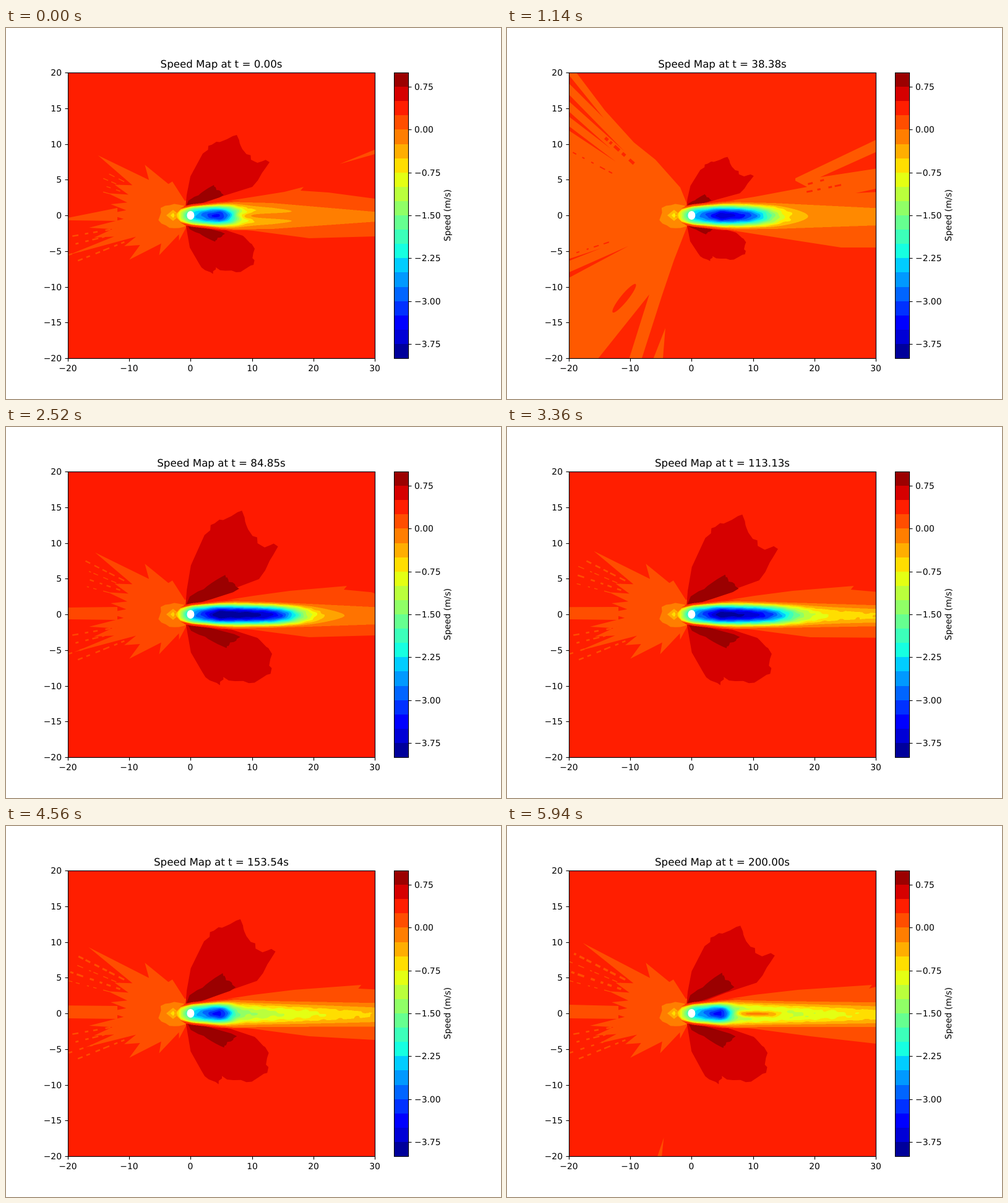
Animation of 800 by 600 pixels, one loop 6 s. Source, as an HTML page with a canvas:

```html
<!DOCTYPE html>
<html lang="en">
<head>
<meta charset="utf-8">
<title>Speed Map</title>
<style>
  html, body { margin: 0; width: 100%; height: 100%; overflow: hidden; background: #fff; }
  canvas { display: block; }
</style>
</head>
<body>
<canvas id="stage" width="800" height="600"></canvas>
<script>
const ctx = document.getElementById('stage').getContext('2d');
const STEPS = 100, STEP_MS = 60;
const LEFT = 100, TOP = 72, RIGHT = 596, BOTTOM = 534;
const BODY_X = 298, BODY_Y = 303;

const clamp = (v, lo, hi) => Math.min(hi, Math.max(lo, v));
const mix = (a, b, k) => a + (b - a) * k;
const sigmoid = v => 1 / (1 + Math.exp(-v));

// Straight segments through [x, y] stops
function ramp(stops, x) {
  let i = 1;
  while (i < stops.length - 1 && x > stops[i][0]) i++;
  const [x0, y0] = stops[i - 1], [x1, y1] = stops[i];
  return mix(y0, y1, clamp((x - x0) / (x1 - x0), 0, 1));
}

function random(seed) {
  return () => {
    seed = (seed + 0x6D2B79F5) | 0;
    let t = Math.imul(seed ^ (seed >>> 15), 1 | seed);
    t = (t + Math.imul(t ^ (t >>> 7), 61 | t)) ^ t;
    return ((t ^ (t >>> 14)) >>> 0) / 4294967296;
  };
}

// Colour scales
const jet = k => {
  k = Math.floor(k * 256) / 255;
  return [
    [[0, 0], [.35, 0], [.66, 1], [.89, 1], [1, .5]],
    [[0, 0], [.125, 0], [.375, 1], [.64, 1], [.91, 0], [1, 0]],
    [[0, .5], [.11, 1], [.34, 1], [.65, 0], [1, 0]]
  ].map(stops => Math.round(255 * ramp(stops, k)));
};

function makeScale(low, high, size) {
  const count = Math.round((high - low) / size);
  const bands = Array.from({ length: count }, (_, i) => jet((i + .5) / count));
  const at = v => bands[clamp(Math.floor((v - low) / size + 1e-6), 0, count - 1)];
  return { bands, at, css: v => `rgb(${at(v)})` };
}
const NORMAL = makeScale(-4, 1, .25);
const DEEP = makeScale(-4.25, 1, .25);
const COARSE = makeScale(-4.5, 1.2, .3);
const isCoarse = step => step >= 14 && step < 38;
const scaleFor = step => isCoarse(step) ? COARSE : step > 10 && step < 50 ? DEEP : NORMAL;

// Shape helpers
function polygon(points, fill) {
  ctx.beginPath();
  points.forEach(([x, y]) => ctx.lineTo(x, y));
  ctx.fillStyle = fill;
  ctx.fill();
}

// Angles in degrees above the upstream (left) direction, seen from the body
function polar(angle, r) {
  const a = angle * Math.PI / 180;
  return [BODY_X - r * Math.cos(a), BODY_Y - r * Math.sin(a)];
}

const wedge = (angle, spread, near, far, fill) =>
  polygon([polar(angle, near), polar(angle - spread / 2, far), polar(angle + spread / 2, far)], fill);

function brokenRay(angle, near, far, width, color) {
  const rnd = random(Math.round(angle * 10));
  ctx.beginPath();
  for (let r = near; r < far; r += 4 + 9 * rnd()) {
    ctx.moveTo(...polar(angle, r));
    ctx.lineTo(...polar(angle, r += 3 + 8 * rnd()));
  }
  ctx.strokeStyle = color;
  ctx.lineWidth = width;
  ctx.stroke();
}

// Adds small teeth to the edges between two vertices
function roughen(points, from, to, amount, seed) {
  const rnd = random(seed), out = [];
  points.forEach(([x, y], i) => {
    out.push([x, y]);
    if (i < from || i >= to) return;
    const [nx, ny] = points[i + 1];
    for (let k = .25; k < 1; k += .25)
      out.push([mix(x, nx, k) + amount * (rnd() - .5), mix(y, ny, k) + amount * (rnd() - .5)]);
  });
  return out;
}

const place = (points, x, y, sx, sy) => points.map(p => [x + p[0] * sx, y + p[1] * sy]);

const UPPER = roughen([[0, 0], [2, -21], [8, -51], [28, -88], [50, -107], [83, -118], [92, -95],
  [112, -75], [136, -74], [108, -34], [60, -19], [30, -8]], 3, 9, 7, 4);
const LOWER = roughen([[0, 0], [3, 17], [7, 40], [22, 66], [45, 83], [49, 72], [82, 80],
  [110, 68], [112, 42], [93, 21], [50, 7], [25, 5]], 3, 9, 6, 9);
const CORE = roughen([[0, 0], [5, -12], [25, -24], [46, -37], [50, -29], [62, -21], [55, -17], [30, -9]], 1, 5, 3, 2);

function drawLobes(step, scale) {
  const coarse = isCoarse(step), k = (step - 19) / 11;
  const late = v => ramp([[0, v[0]], [42, v[1]], [99, v[2]]], step);
  const size = (early, grown, ...all) => coarse ? mix(early, grown, k) : late(all);
  const red = scale.css(.7), dark = scale.css(.95);
  polygon(place(UPPER, 290, 291, size(.8, .86, 1, 1.1, 1.05), size(.7, .73, 1, 1.32, 1.1)), red);
  polygon(place(LOWER, 290, 315, size(.86, .98, 1, 1.25, 1.17), size(.75, .8, 1, 1.24, 1.24)), red);
  const sx = size(.65, .75, 1, 1.4, 1.25), sy = size(.6, .7, 1, 1.4, 1.45);
  polygon(place(CORE, 290, 291, sx, sy), dark);
  polygon(place(CORE, 292, 316, sx, -sy * .8), dark);
}

// Upstream fan: spikes of uneven length with valleys between them
function drawFan(step, color, back) {
  const k = step / 99;
  const spikes = [[76, 25], [62, 62], [48, 110], [33, 178 + 31 * k * k], [22, 132], [15, 138], [8, 130], [1, 135],
    [-7, 165], [-13, 160], [-18, 207 - 50 * k * k], [-25, 118], [-36, 122], [-52, 82], [-66, 45], [-85, 14]];
  const outline = [];
  spikes.forEach(([angle, r], i) => {
    outline.push(polar(angle, r));
    const next = spikes[i + 1];
    if (next) outline.push(polar(mix(angle, next[0], .5), Math.min(r, next[1]) * (r < 70 ? 1 : .8)));
  });
  polygon(outline, color);
  const slabTop = ramp([[0, 307], [40, 292], [99, 289]], step);
  polygon([[LEFT, slabTop], [180, 291], [180, 312], [LEFT, 311]], color);
  for (let i = 0; i < 4; i++) {
    brokenRay(-10 - 4 * i, 115, 205, 2.5, color);
    brokenRay(15 + 4 * i, 120, mix(150, 225, k), 1.5 + 2 * k * (i % 2), color);
  }
  if (step < 14) wedge(161, 1.3, 255, 320, color);
  if (step > 90) wedge(-77.5, 2, mix(235, 206, (step - 90) / 9), 245, color);
}

function drawWideFan(step, color, back) {
  polygon([[LEFT, TOP], [112, TOP], [158, 133], [205, 185], [240, 213], [280, 258], [293, 290],
    [293, 316], [270, 375], [250, 434], [218, BOTTOM], [LEFT, BOTTOM]], color);
  wedge(-77, 4, 187, 245, color);
  wedge(-62, 11, 145, 300, back);
  for (let i = 0; i < 4; i++) wedge(48 - 4.2 * i, 1.8, [212, 150, 170, 150][i], 300, back);
  wedge(-26, 2.2, 113, 235, back);
  wedge(-20, 1, 155, 230, back);
  brokenRay(42, 125, 190, 5, back);
  brokenRay(28, 145, 225, 2, back);
  brokenRay(-18, 140, 205, 2, back);
  const far = mix(202, 222, (step - 19) / 11), [x, y] = polar(-51, (143 + far) / 2);
  ctx.beginPath();
  ctx.ellipse(x, y, (far - 143) / 2, 6, -.89, 0, 7);
  ctx.fill();
}

function drawOuterWake(step, color) {
  const k = step / 99, crest = ramp([[0, 481], [42, 551], [99, 590]], step);
  const drop = mix(276, 260, k);
  polygon([[330, 284], [400, 273], [mix(450, 470, k), 265], [crest, 257], [crest - 5, 263],
    [Math.min(crest + 40, RIGHT), mix(266, drop, k)], [RIGHT, drop],
    [RIGHT, ramp([[0, 337], [42, 337], [99, 352]], step)], [490, 340], [400, 328], [330, 322]], color);
}

function drawWideWake(color, back) {
  polygon([[330, 284], [400, 273], [485, 257], [466, 247], [466, 243], [RIGHT, 181],
    [RIGHT, 355], [540, 355], [450, 341], [330, 322]], color);
  wedge(163.5, 5, 217, 320, back);
  wedge(172.3, 1.5, 268, 320, back);
  brokenRay(165, 195, 230, 3, back);
  brokenRay(168.5, 190, 255, 3, back);
}

function drawHalo(scale) {
  const rnd = random(7), ring = [];
  for (let a = 0; a < 360; a += 18) {
    const r = .82 + .3 * rnd(), t = a * Math.PI / 180;
    ring.push([272 + 26 * r * Math.cos(t), 304 + 21 * r * Math.sin(t)]);
  }
  polygon(ring, scale.css(-.1));
  const diamond = (x, rx, ry, v) =>
    polygon([[x - rx, 303], [x, 303 - ry], [x + rx, 303], [x, 303 + ry]], scale.css(v));
  diamond(270, 11, 9, -.4);
  diamond(270, 4, 4, -.65);
}

// Wake: a deep core with a soft front, a decaying tail and a slot opening on the axis
const WAKE = [
  { at: 0, core: 2.4, front: 368, soft: 10, tail: 1.3, decay: 110, slot: .85, slotEnd: 600, end: 8 },
  { at: 19, core: 3.7, front: 420, soft: 18, tail: .5, decay: 180, slot: 0, slotEnd: 600, end: 14 },
  { at: 42, core: 3.8, front: 468, soft: 18, tail: .6, decay: 200, slot: 0, slotEnd: 440, end: 14 },
  { at: 56, core: 2.9, front: 450, soft: 20, tail: 1.1, decay: 380, slot: 0, slotEnd: 440, end: 17 },
  { at: 76, core: 1.9, front: 362, soft: 6, tail: 1.7, decay: 220, slot: 0, slotEnd: 440, end: 19 },
  { at: 99, core: 1.7, front: 358, soft: 5, tail: 1.9, decay: 240, slot: .9, slotEnd: 440, end: 20 }
];

function wakeAt(step) {
  const now = {};
  for (const name of Object.keys(WAKE[0])) now[name] = ramp(WAKE.map(w => [w.at, w[name]]), step);
  return now;
}

const SS = 2, FIELD_X = 272, FIELD_Y = 273, FIELD_W = RIGHT - FIELD_X, FIELD_H = 60;
const fieldCanvas = document.createElement('canvas');
fieldCanvas.width = FIELD_W * SS;
fieldCanvas.height = FIELD_H * SS;
const fieldCtx = fieldCanvas.getContext('2d');
const fieldImage = fieldCtx.createImageData(fieldCanvas.width, fieldCanvas.height);

function drawField(step, scale) {
  const wake = wakeAt(step), { width: w, height: h } = fieldCanvas, data = fieldImage.data;
  data.fill(0);
  for (let px = 0; px < w; px++) {
    const x = FIELD_X + px / SS;
    const rise = ramp([[274, .1], [292, .5], [304, .66], [325, .82], [345, 1]], x);
    const core = wake.core * sigmoid((wake.front - x) / wake.soft);
    const tail = wake.tail * Math.exp(-Math.max(0, x - 330) / wake.decay);
    const slot = wake.slot * sigmoid((x - 372) / 5) * sigmoid((wake.slotEnd - x) / 8);
    const edge = ramp([[274, 3], [282, 11], [300, 15], [345, 20], [370, 22], [430, 21], [RIGHT, wake.end]], x);
    const power = ramp([[304, .6], [370, 1.45]], x);
    const limit = ramp([[280, 0], [290, .5], [345, .5], [420, 0]], x);
    const drift = ramp([[330, 0], [460, 1], [RIGHT, 2]], x);
    for (let py = 0; py < h; py++) {
      const y = FIELD_Y + py / SS - BODY_Y - drift, a = Math.abs(y);
      let v = (a - edge) * .15;
      if (a < edge) {
        const open = 1 - slot * Math.exp(-a * a / 36);
        v = -rise * (core + tail * open) * Math.pow(1 - (a / edge) ** 2, power);
        if (v < -.5) v += .08 * Math.sin(x * .23) * Math.sin(y * .5 + x * .05);
      }
      if (v >= limit) continue;
      const o = (py * w + px) * 4;
      data.set(scale.at(v), o);
      data[o + 3] = 255;
    }
  }
  fieldCtx.putImageData(fieldImage, 0, 0);
  ctx.drawImage(fieldCanvas, FIELD_X, FIELD_Y, FIELD_W, FIELD_H);
}

function drawMap(step) {
  const scale = scaleFor(step), back = scale.css(.4), fan = scale.css(.1);
  ctx.save();
  ctx.beginPath();
  ctx.rect(LEFT, TOP, RIGHT - LEFT, BOTTOM - TOP);
  ctx.clip();
  ctx.fillStyle = back;
  ctx.fillRect(LEFT, TOP, RIGHT - LEFT, BOTTOM - TOP);
  if (isCoarse(step)) {
    drawWideFan(step, fan, back);
    drawWideWake(fan, back);
  } else {
    drawFan(step, fan, back);
    drawOuterWake(step, fan);
  }
  drawLobes(step, scale);
  drawHalo(scale);
  drawField(step, scale);
  ctx.beginPath();
  ctx.ellipse(298.4, BODY_Y, 6, 7, 0, 0, 7);
  ctx.fillStyle = '#fff';
  ctx.fill();
  ctx.restore();
}

function label(text, x, y, align, size = 13.89) {
  ctx.font = `${size}px "DejaVu Sans", sans-serif`;
  ctx.textRendering = 'geometricPrecision';
  ctx.textAlign = align;
  ctx.fillStyle = '#000';
  ctx.fillText(text.replace('-', '\u2212'), x, y);
}

function tickMark(x, y, dx, dy) {
  ctx.beginPath();
  ctx.moveTo(x + .5, y + .5);
  ctx.lineTo(x + .5 + dx, y + .5 + dy);
  ctx.stroke();
}

function drawAxes() {
  ctx.strokeStyle = '#000';
  ctx.lineWidth = 1.11;
  ctx.strokeRect(LEFT + .5, TOP + .5, RIGHT - LEFT, BOTTOM - TOP);
  for (let v = -20; v <= 30; v += 10) {
    const x = Math.round(LEFT + (v + 20) * 9.92);
    tickMark(x, BOTTOM, 0, 5);
    label(String(v), x, 555, 'center');
  }
  for (let v = -20; v <= 20; v += 5) {
    const y = Math.round(BODY_Y - v * 11.55);
    tickMark(LEFT, y, -5, 0);
    label(String(v), 90, y + 5, 'right');
  }
}

function drawColorBar() {
  const count = NORMAL.bands.length, edge = i => Math.round(mix(BOTTOM, TOP, i / count));
  NORMAL.bands.forEach((rgb, i) => {
    ctx.fillStyle = `rgb(${rgb})`;
    ctx.fillRect(627, edge(i + 1), 23.5, edge(i) - edge(i + 1));
  });
  ctx.strokeRect(627.5, TOP + .5, 23, BOTTOM - TOP);
  for (let v = -3.75; v <= .75; v += .75) {
    const y = Math.round(BOTTOM - (v + 4) * 92.4);
    tickMark(650, y, 5, 0);
    label(v.toFixed(2), 660, y + 5, 'left');
  }
  ctx.save();
  ctx.translate(718, BODY_Y);
  ctx.rotate(-Math.PI / 2);
  label('Speed (m/s)', 0, 0, 'center');
  ctx.restore();
}

function drawFrame(step) {
  ctx.fillStyle = '#fff';
  ctx.fillRect(0, 0, 800, 600);
  drawMap(step);
  drawAxes();
  drawColorBar();
  label(`Speed Map at t = ${(step * 200 / (STEPS - 1)).toFixed(2)}s`, 348, 64, 'center', 16.67);
}

let shown = -1;
const start = performance.now();
function tick() {
  const step = Math.floor((performance.now() - start) / STEP_MS) % STEPS;
  if (step !== shown) drawFrame(shown = step);
  requestAnimationFrame(tick);
}
tick();
</script>
</body>
</html>
```
